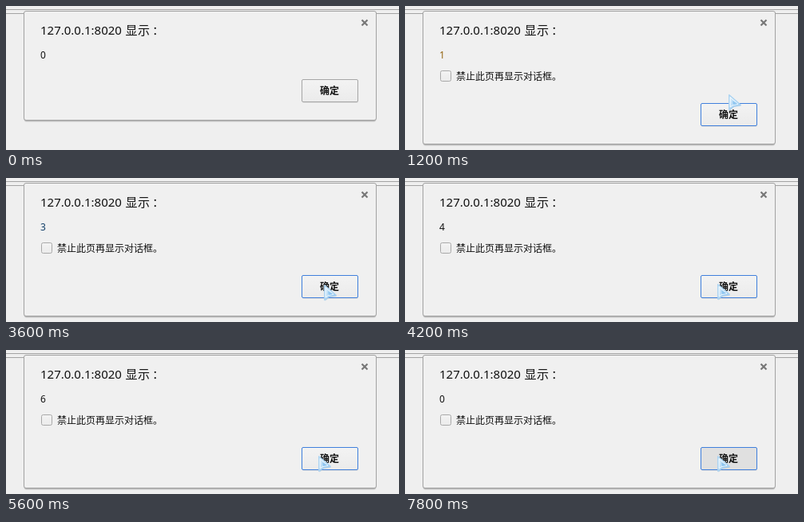
Recreate the animation shown at these times as an HTML page. Size 492 px wide and 181 px high, loop 8000 ms.

```html
<!DOCTYPE html>
<html lang="zh-CN">
<head>
<meta charset="utf-8">
<title>Alert loop</title>
<style>
html, body { margin: 0; width: 100%; height: 100%; overflow: hidden; background: #efefef; }
svg { display: block; width: 492px; height: 181px; }
text { font-family: "Noto Sans", "Noto Sans CJK SC", "Noto Sans CJK", sans-serif; fill: #111; }
.small { font-size: 12px; }
.title { font-size: 15px; }
</style>
</head>
<body>
<svg viewBox="0 0 492 181">
  <defs>
    <linearGradient id="face" x2="0" y2="1">
      <stop offset="0" stop-color="#f3f3f3"/><stop offset="1" stop-color="#ebebeb"/>
    </linearGradient>
    <linearGradient id="glass" x2="1" y2="1">
      <stop offset="0" stop-color="#e2f2fc"/><stop offset="1" stop-color="#8cc4ef"/>
    </linearGradient>
  </defs>
  <rect width="492" height="181" fill="#efefef"/>
  <path d="M0 4.5H492M0 9.5H492" stroke="#a3a3a3"/>

  <g id="dialog">
    <rect id="shadow2" x="23" y="8" width="440" rx="3" fill="#d9d9d9"/>
    <rect id="shadow1" x="22.5" y="7" width="441" rx="3" fill="#b9b9b9"/>
    <rect id="panel" x="22.5" y="6.5" width="441" rx="2.5" fill="#f0f0f0" stroke="#a2a2a2"/>
    <text class="title" x="43" y="36">127.0.0.1:8020</text>
    <text class="title" x="149.5 165 183" y="36">显示：</text>
    <path d="M445.5 17.5l7 7m0-7l-7 7" stroke="#777" stroke-width="2.2"/>
    <text id="count" class="small" x="43" y="66"></text>
    <g id="option">
      <rect x="44.5" y="81.5" width="13" height="13" rx="2" fill="url(#face)" stroke="#a9a9a9"/>
      <text class="small" x="64" y="93">禁止此页再显示对话框。</text>
    </g>
    <g id="button">
      <rect x="371" y="1.5" width="70" height="28.5" rx="2" fill="#dedede"/>
      <rect id="face-box" x="370.5" y=".5" width="70" height="28" rx="1.5"/>
      <text class="small" x="393" y="19" font-weight="bold">确定</text>
    </g>
  </g>

  <g id="cursor">
    <path d="M1.5 1.5L1.5 20.5L7 16L16 14.5Z" fill="#7fb2dc" opacity=".55"/>
    <path d="M.8 .8L.8 19.2L6.4 14.9L15.2 13.2Z" fill="url(#glass)" stroke="#a9d2f1" stroke-width="1.4" stroke-linejoin="round"/>
    <path d="M2.2 3.6V16L5.8 13.4L12 12.2Z" fill="none" stroke="#f4fbff" stroke-width="1"/>
    <path d="M5 8.2L11.6 12L6 13Z" fill="#8fc6f0"/>
  </g>
</svg>
<script>
const LOOP = 8000;
const el = id => document.getElementById(id);

// [time, value]; each value holds until the next entry
const counts = [[0, "0"], [1100, ""], [1200, "1"], [2500, "2"], [3500, ""], [3600, "3"],
  [4200, "4"], [4900, ""], [5000, "5"], [5600, "6"], [6200, "7"], [6800, "8"],
  [7000, "9"], [7600, "0"]];
const presses = [[0, 0], [1000, 1], [1100, 0], [2300, 1], [2500, 0], [2700, 1], [3500, 0],
  [4100, 1], [4200, 0], [4400, 1], [4900, 0], [5200, 1], [5600, 0], [5900, 1], [6200, 0],
  [6400, 1], [6800, 0], [7400, 1], [7600, 0], [7800, 1]];
const places = [[0, [434, 190]], [100, [434, 180]], [700, [426, 155]], [800, [414, 128]],
  [900, [405, 111]], [1500, [404, 120]], [2000, [402, 125]], [2100, [400, 130]],
  [2200, [398, 134]], [3800, [394, 134]], [3900, [391, 133]]];
const tints = { 1: "#93640f", 2: "#1d1255", 3: "#123f68" };

const at = (track, t) => track.findLast(([start]) => start <= t)[1];

function draw(t) {
  const count = at(counts, t);
  const first = t < 1100;
  const bottom = first ? 143.5 : 173.5;
  el("dialog").style.display = count ? "" : "none";
  el("option").style.display = first ? "none" : "";
  el("panel").setAttribute("height", bottom - 6.5);
  el("shadow1").setAttribute("height", bottom - 5.5);
  el("shadow2").setAttribute("height", bottom - 5.5);
  el("count").textContent = count;
  el("count").style.fill = tints[count] || "#111";
  el("button").setAttribute("transform", `translate(0 ${first ? 92 : 122})`);
  el("face-box").setAttribute("fill", at(presses, t) ? "#e0e0e0" : "url(#face)");
  el("face-box").setAttribute("stroke", first ? "#a6a6a6" : "#3f7fdc");
  el("cursor").setAttribute("transform", `translate(${at(places, t)})`);
}

const begin = performance.now();
function tick(now) {
  draw(Math.max(0, now - begin) % LOOP);
  requestAnimationFrame(tick);
}
draw(0);
requestAnimationFrame(tick);
</script>
</body>
</html>
```
